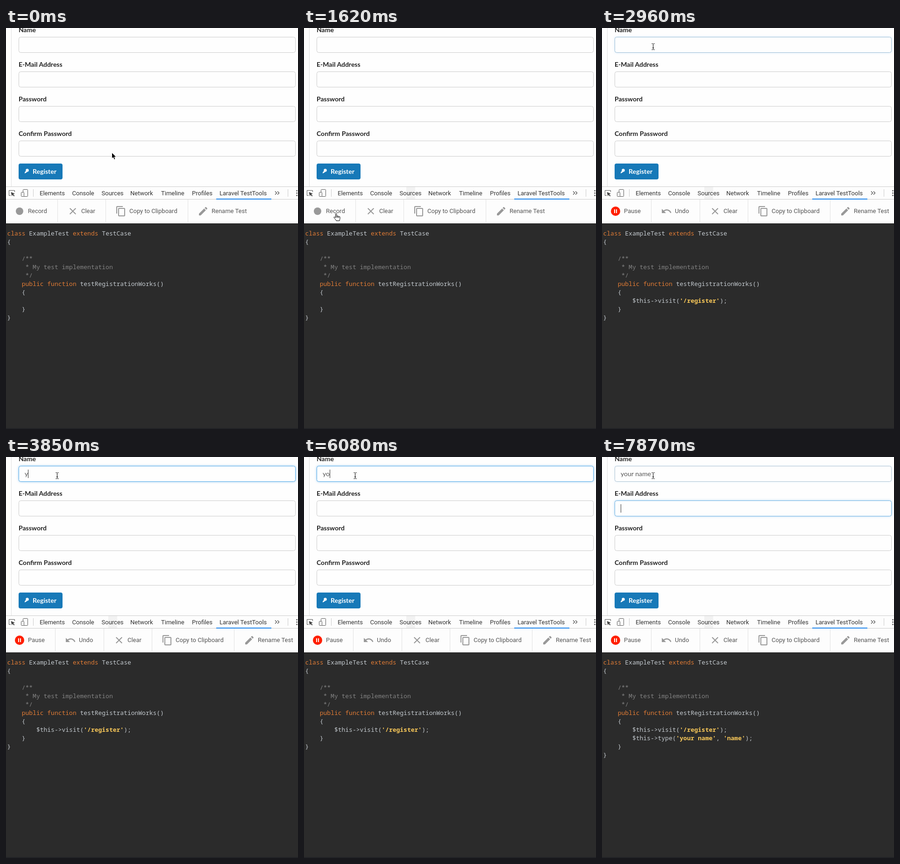
These frames come from a looping animation (625 px wide and 858 px high, 8 s). An HTML page:

```html
<!DOCTYPE html>
<html lang="en">
<head>
<meta charset="utf-8">
<title>Test recorder</title>
<style>
html, body { margin: 0; width: 100%; height: 100%; overflow: hidden; background: #fefefe; }
svg { display: block; }
text { white-space: pre; }
.form { font: 14px Lato, sans-serif; fill: #555; }
.label { font-weight: 700; fill: #222; }
.field { fill: #fefefe; stroke: #ccc; }
.focus { fill: #fefefe; stroke: #5aaeea; filter: drop-shadow(0 0 2.5px rgba(102, 175, 233, .65)); }
.tabs, .tools { font: 13px Roboto, sans-serif; fill: #333; }
.tools { fill: #555; }
.icon { fill: #999; }
.line { stroke: #e2e2e2; fill: none; }
.code { font: 13px "Noto Sans Mono", "DejaVu Sans Mono", monospace; fill: #c3c9ce; }
.k { fill: #e07b35; }
.c { fill: #828282; }
.s { fill: #f9c859; font-weight: 600; }
</style>
</head>
<body>
<svg width="625" height="858" viewBox="0 0 625 858">
  <defs>
    <path id="close" d="M19 6.41L17.59 5 12 10.59 6.41 5 5 6.41 10.59 12 5 17.59 6.41 19 12 13.41 17.59 19 19 17.59 13.41 12z"/>
    <path id="copy" d="M16 1H4c-1.1 0-2 .9-2 2v14h2V3h12V1zm3 4H8c-1.1 0-2 .9-2 2v14c0 1.1.9 2 2 2h11c1.1 0 2-.9 2-2V7c0-1.1-.9-2-2-2zm0 16H8V7h11v14z"/>
    <path id="pencil" d="M3 17.25V21h3.75L17.81 9.94l-3.75-3.75L3 17.25zM20.71 7.04c.39-.39.39-1.02 0-1.41l-2.34-2.34c-.39-.39-1.02-.39-1.41 0l-1.83 1.83 3.75 3.75 1.83-1.83z"/>
    <path id="undo" d="M12.5 8c-2.65 0-5.05.99-6.9 2.6L2 7v9h9l-3.62-3.62c1.39-1.16 3.16-1.88 5.12-1.88 3.54 0 6.55 2.31 7.6 5.5l2.37-.78C21.08 11.03 17.15 8 12.5 8z"/>
    <path id="arrow" d="M.5 .5V13.5L3.5 10.8 5.5 15.5 8 14.5 6 10H10z" stroke="#fff"/>
    <path id="hand" d="M4.5 10V2.2C4.5 .5 7 .5 7 2.2V7C7 5.6 9.3 5.7 9.3 7.2 9.3 6 11.5 6.2 11.5 7.7 11.7 6.8 14 6.9 14 8.6V11.5C14 13.5 13 14 13 16.5H6C5.5 14 3 12.5 1 9.5 .5 8 2.5 7.5 4.5 10zM7 7V10M9.3 7.2V10M11.5 7.7V10" fill="#fff" stroke="#000"/>
    <path id="beam" d="M.5 .5H2.5L3.5 1.5 4.5 .5H6.5M3.5 1.5V12.5M.5 13.5H2.5L3.5 12.5 4.5 13.5H6.5M2 9.5H5" fill="none" stroke="#000"/>
  </defs>

  <path class="line" stroke="#ddd" d="M11.5 0V339"/>
  <g id="form" class="form"></g>
  <text id="typed" class="form" x="40" y="41"></text>
  <rect id="caret" width="1" height="18" fill="#333"/>
  <rect x="27" y="290" width="94" height="34" rx="4" fill="#1779b8"/>
  <g fill="#fff">
    <circle cx="45.5" cy="304.4" r="3.2"/>
    <path d="M40 311.2c0-3 1-4.7 2.8-4.7q2.7 2 5.4 0c1.800 2.8 1.700 2.8 4.700q0 2-2 2h-7q-2 0-2-2z"/>
    <text class="form" style="font-weight:700;fill:#fff" x="57" y="312">Register</text>
  </g>

  <rect y="339" width="625" height="79" fill="#fdfdfd"/>
  <rect id="hover" x="219" y="340" width="19" height="26" fill="#f2f2f2"/>
  <path d="M0 339.500H625M0 366.500H625M58.500 345V361M603.500 345V361" stroke="#ccc"/>
  <rect x="450" y="365" width="118" height="2" fill="#2388ec"/>
  <g fill="none" stroke="#5a5a5a">
    <path d="M18.500 351V347.500H6.500V358.500H10"/>
    <path d="M10.500 351L19 354.500 15.500 355.700 18.500 359 17 360.200 14 357 12.500 360z" fill="#444" stroke="none"/>
    <rect x="36.500" y="345.500" width="10" height="15" rx="1"/>
    <rect x="32.500" y="351.500" width="6" height="9" rx="1" fill="#fdfdfd"/>
    <path d="M576 349.500L579.500 353 576 356.500M581 349.500L584.500 353 581 356.500" stroke-width="1.400"/>
    <path d="M622.500 347V349.500M622.500 352V354.500M622.500 357V359.500" stroke-width="2.500"/>
  </g>
  <g id="tabs" class="tabs"></g>

  <g class="tools">
    <g id="idle">
      <circle class="icon" cx="29" cy="392" r="8"/>
      <text x="47" y="396">Record</text>
      <path class="line" d="M110.500 367V417"/>
    </g>
    <g id="live">
      <circle cx="29" cy="392" r="10" fill="#ff1f00"/>
      <path d="M26 388h2v8h-2zM30 388h2v8h-2z" fill="#fff"/>
      <text x="47" y="396">Pause</text>
      <use class="icon" href="#undo" x="126" y="380"/>
      <text x="156" y="396">Undo</text>
      <path class="line" d="M105.500 367V417M209.500 367V417"/>
    </g>
    <g id="rest">
      <use class="icon" href="#close" x="131" y="380"/>
      <text x="161" y="396">Clear</text>
      <use class="icon" href="#copy" x="234" y="380"/>
      <text x="264" y="396">Copy to Clipboard</text>
      <use class="icon" href="#pencil" x="410" y="380"/>
      <text x="440" y="396">Rename Test</text>
      <path class="line" d="M213.500 367V417M389.500 367V417"/>
    </g>
  </g>

  <rect y="418" width="625" height="440" fill="#2b2b2b"/>
  <rect y="856" width="625" height="2" fill="#222326"/>
  <g id="code" class="code"></g>
  <use id="cursor"/>
</svg>
<script>
const $ = id => document.getElementById(id);
const LOOP = 8000;

// Step tracks: [start time, ...values], each held until the next entry.
const cursorTrack = [
  [0, 'arrow', 226, 266], [150, 'arrow', 225, 275], [300, 'arrow', 222, 305],
  [450, 'arrow', 219, 345], [600, 'arrow', 214, 410], [740, 'arrow', 201, 462],
  [890, 'arrow', 180, 492], [1030, 'arrow', 138, 490], [1180, 'arrow', 103, 452],
  [1330, 'arrow', 84, 420], [1480, 'hand', 68, 400], [1620, 'hand', 63, 396],
  [1920, 'hand', 63, 398], [2360, 'hand', 65, 386], [2500, 'arrow', 72, 330],
  [2660, 'arrow', 92, 175], [2810, 'arrow', 105, 66], [2960, 'beam', 106, 33]
];
const typedTrack = [
  [0, ''], [3850, 'y'], [6080, 'yo'], [6230, 'your'], [6530, 'your n'],
  [6980, 'your na'], [7130, 'your nam'], [7270, 'your name']
];
const caretTrack = [
  [0, 0], [3110, 1], [3400, 0], [3850, 1], [4290, 0], [4890, 1],
  [5340, 0], [5780, 1], [6530, 0], [6830, 1]
];
const focusTrack = [[0, 0, 0], [2960, .4, 0], [3110, 1, 0], [7870, .25, .8]];
const at = (track, t) => track.findLast(step => step[0] <= t).slice(1);

const span = (cls, text) => `<tspan class="${cls}">${text}</tspan>`;
const visitLine = `        $this-&gt;visit(${span('s', "'/register'")});`;
const typeLine = `        $this-&gt;type(${span('s', "'your name'")}, ${span('s', "'name'")});`;

function showCode(body) {
  const lines = [
    `${span('k', 'class')} ExampleTest ${span('k', 'extends')} TestCase`, '{', '',
    span('c', '    /**'), span('c', '     * My test implementation'), span('c', '     */'),
    `    ${span('k', 'public function')} testRegistrationWorks()`, '    {',
    ...body, '    }', '}'
  ];
  $('code').innerHTML = lines.map((s, i) => `<text x="2.500" y="${444 + 18 * i}">${s}</text>`).join('');
}

$('form').innerHTML = ['Name', 'E-Mail Address', 'Password', 'Confirm Password'].map((name, i) => {
  const y = 19.5 + 74 * i;
  const box = `x="27.500" y="${y}" width="592" height="33" rx="4"`;
  return `<text class="label" x="27" y="${y - 10.5}">${name}</text><rect class="field" ${box}/>` +
    (i < 2 ? `<rect class="focus" id="focus${i}" ${box}/>` : '');
}).join('');

$('tabs').innerHTML = Object.entries({
  Elements: 72, Console: 141.5, Sources: 204.5, Network: 266,
  Timeline: 332, Profiles: 398, 'Laravel TestTools': 457
}).map(([name, x]) => `<text x="${x}" y="358">${name}</text>`).join('');

const show = (id, on) => $(id).setAttribute('visibility', on ? 'visible' : 'hidden');
let codeStage = -1;

function draw(t) {
  const [shape, x, y] = at(cursorTrack, t);
  $('cursor').setAttribute('href', '#' + shape);
  $('cursor').setAttribute('transform', `translate(${x} ${y})`);

  const live = t >= 1920;
  show('idle', !live);
  show('live', live);
  show('hover', t >= 450);
  $('rest').setAttribute('transform', `translate(${live ? 99 : 0} 0)`);

  at(focusTrack, t).forEach((level, i) => $('focus' + i).setAttribute('opacity', level));
  $('typed').textContent = at(typedTrack, t)[0];
  const inMail = t >= 7870;
  $('caret').setAttribute('x', inMail ? 40 : Math.round(40 + $('typed').getComputedTextLength()));
  $('caret').setAttribute('y', inMail ? 101 : 27);
  show('caret', at(caretTrack, t)[0]);

  const stage = inMail ? 2 : live ? 1 : 0;
  if (stage !== codeStage) showCode([[''], [visitLine], [visitLine, typeLine]][codeStage = stage]);
}

const start = performance.now();
function tick() {
  draw((performance.now() - start) % LOOP);
  requestAnimationFrame(tick);
}
tick();
</script>
</body>
</html>
```
